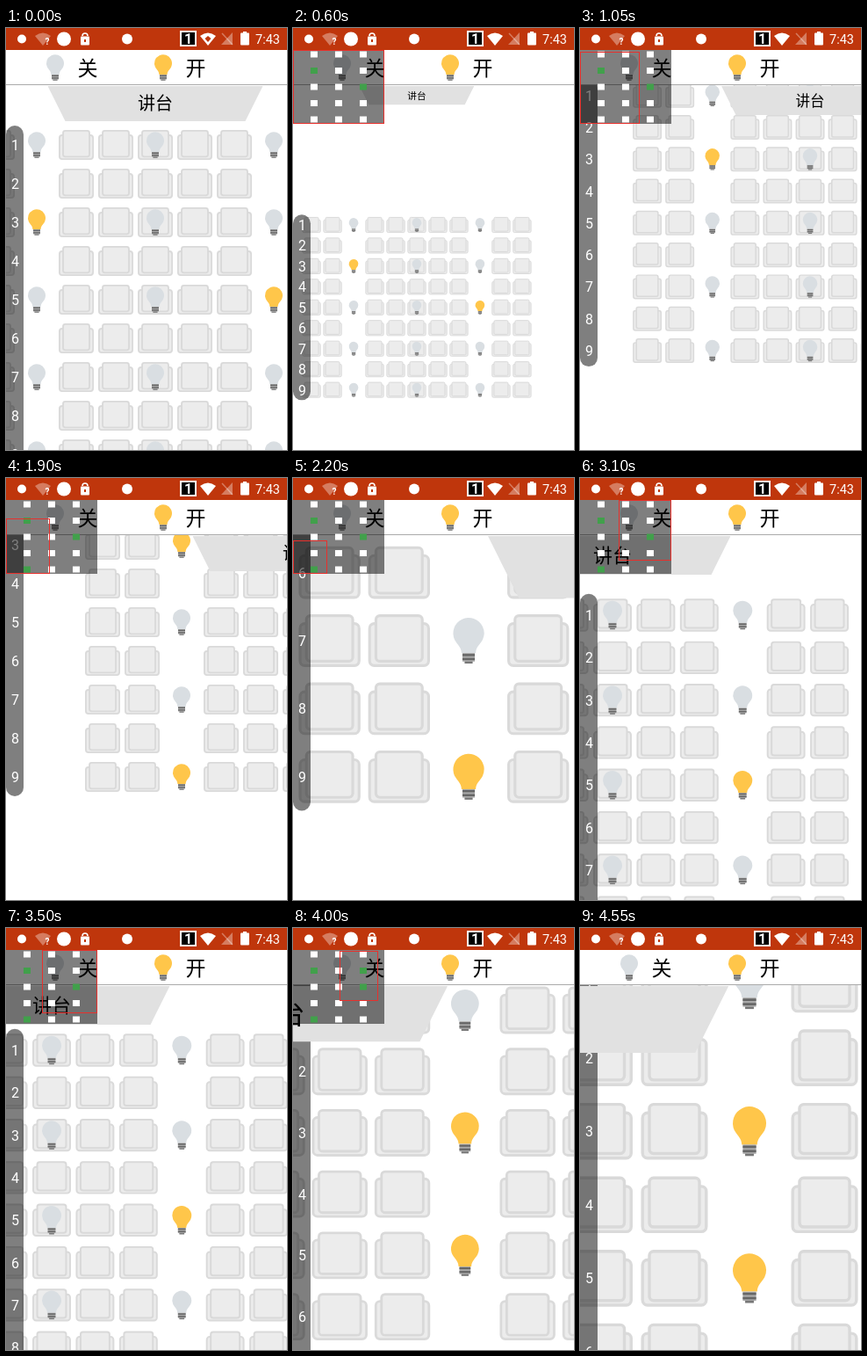
These frames come from a looping animation (320x480 px, 4950 ms). An HTML page with a canvas:

```html
<!DOCTYPE html>
<html lang="zh-CN">
<head>
<meta charset="utf-8">
<title>讲台</title>
<style>
html, body { margin: 0; width: 320px; height: 480px; overflow: hidden; background: #fff; }
canvas { display: block; }
</style>
</head>
<body>
<canvas id="stage" width="320" height="480"></canvas>
<script>
const c = document.getElementById('stage').getContext('2d');
const LOOP = 4950, STEP = 50;
const CJK = '"Noto Sans CJK SC", "Noto Sans CJK", sans-serif';
const LATIN = 'Roboto, sans-serif';

// time, scale, x of the middle column, y of row 1, eased approach
const keys = [
  [0, 1, 170, 133], [350, 1, 170, 133],
  [600, .533, 141, 224], [700, .533, 141, 224],
  [1300, 1, 335, -12, 1], [1900, 1, 335, -12],
  [2300, 1.9, 456.5, -329, 1], [2600, 1.098, 254, 21.6, 1],
  [3100, 1.098, 37, 156], [3500, 1.098, 52, 139, 1], [3800, 1.098, 52, 139],
  [4150, 1.9, -63.5, 64, 1], [LOOP, 1.9, -63.5, 64]
];

function pose(t) {
  const i = keys.findIndex(k => k[0] > t);
  const a = keys[i - 1], b = keys[i];
  let u = (t - a[0]) / (b[0] - a[0]);
  if (b[4]) u = u * u * (3 - 2 * u);
  return [1, 2, 3].map(n => a[n] + (b[n] - a[n]) * u);
}

function isOn(col, row, t) {
  return col === 2 && (row === 3 || row === 9 && t >= 1900) ||
         col === 8 && (row === 5 || row === 3 && t >= 3700);
}

function rect(x, y, w, h, fill) {
  c.fillStyle = fill;
  c.fillRect(x, y, w, h);
}

function round(x, y, w, h, r, fill, line) {
  c.beginPath();
  c.roundRect(x, y, w, h, r);
  c.fillStyle = fill;
  c.fill();
  if (line) { c.strokeStyle = line; c.stroke(); }
}

function shape(points, fill) {
  c.beginPath();
  points.forEach(p => c.lineTo(...p));
  c.closePath();
  c.fillStyle = fill;
  c.fill();
}

function dot(x, y, r) {
  c.beginPath();
  c.arc(x, y, r, 0, 7);
  c.fillStyle = '#fff';
  c.fill();
}

function text(str, x, y, font, fill) {
  c.font = font;
  c.fillStyle = fill;
  c.textAlign = 'center';
  c.fillText(str, x, y);
}

function at(x, y, s, draw) {
  c.save();
  c.translate(x, y);
  c.scale(s, s);
  draw();
  c.restore();
}

function seat() {
  c.lineWidth = 1.8;
  round(-19.1, -11, 38.2, 27.1, 3, '#ececec', '#dadada');
  round(-15, -16.1, 30, 29.4, 2.5, '#ececec', '#d9d9d9');
}

function bulb(on) {
  c.beginPath();
  c.arc(0, -4.8, 10, 2.7, .44);
  c.bezierCurveTo(7, 3, 4.8, 4, 4.6, 8);
  c.lineTo(-4.6, 8);
  c.bezierCurveTo(-4.8, 4, -7, 3, -9, -.5);
  c.fillStyle = on ? '#ffc64a' : '#d9dee2';
  c.fill();
  rect(-4, 8, 8, 5.5, '#aaa');
  rect(-4, 8.6, 8, 1.4, '#666');
  rect(-4, 11.2, 8, 1.4, '#666');
  rect(-2.6, 13.4, 5.2, 1.4, '#777');
}

function hall(t, s, x, y) {
  for (let row = 1; row <= 9; row++) {
    for (let col = 0; col <= 10; col++) {
      const aisle = col === 2 || col === 8;
      at(x + (col - 5) * 45 * s, y + (row - 1) * 44 * s, s, () => {
        if (!aisle) seat();
        if (row % 2 && (aisle || col === 5)) bulb(isOn(col, row, t));
      });
    }
  }
  round(0, y - 22 * s, 20, 396 * s, 10, 'rgba(0,0,0,.5)');
  for (let row = 1; row <= 9; row++)
    text(row, 10.5, y + (row - 1) * 44 * s + 6, '16px ' + LATIN, '#fff');
  at(x, 66, s, () => {
    shape([[-122.5, 0], [122.5, 0], [102.5, 40], [-102.5, 40]], '#e1e1e1');
    text('讲台', 0, 27.3, '500 20px ' + CJK, '#000');
  });
}

function header() {
  rect(0, 25, 320, 40, '#fff');
  rect(0, 64, 320, 1, '#aaa');
  at(56, 45, 1, () => bulb(false));
  at(179, 45, 1, () => bulb(true));
  text('关', 93, 54, '23px ' + CJK, '#000');
  text('开', 216, 54, '23px ' + CJK, '#000');
}

function overview(t, s, x, y) {
  rect(0, 25, 104, 84, 'rgba(0,0,0,.5)');
  for (let row = 1; row <= 9; row += 2)
    for (const col of [2, 5, 8])
      rect(col * 9.333 + 1.3, 26.5 + (row - 1) * 9.25, 8, 7,
        isOn(col, row, t) ? '#41a04b' : '#fff');
  const kx = 9.333 / 45 / s, ky = 9.25 / 44 / s;
  const left = Math.max(0, 50.5 - x * kx);
  const right = Math.min(104, 53 + (320 - x) * kx);
  const top = Math.max(25, 30 + (65 - y) * ky);
  const bottom = Math.min(109, 31.8 + (480 - y) * ky);
  c.strokeStyle = '#e8302c';
  c.lineWidth = 1;
  c.strokeRect(Math.round(left) + .5, Math.round(top) + .5,
    Math.round(right - left) - 1, Math.round(bottom - top) - 1);
}

function wifi(x, fill) {
  c.beginPath();
  c.moveTo(x, 20);
  c.lineTo(x - 9, 9);
  c.quadraticCurveTo(x, 2, x + 9, 9);
  c.closePath();
  c.fillStyle = fill;
  c.fill();
}

function statusBar(t) {
  const red = '#bf360c', pale = 'rgba(255,255,255,.35)';
  rect(0, 0, 320, 25, red);
  dot(18, 12.5, 5);
  wifi(42, pale);
  text('?', 47, 19, 'bold 10px ' + LATIN, '#fff');
  dot(66, 12.5, 8);
  c.strokeStyle = '#fff';
  c.lineWidth = 1.6;
  c.beginPath();
  c.arc(90, 9, 3, Math.PI, 0);
  c.stroke();
  round(85, 9.5, 10, 10, 1, '#fff');
  rect(89, 13, 2, 3, red);
  dot(138, 12.5, 6);

  rect(198, 3, 19, 18, '#fff');
  rect(200, 5, 15, 14, '#000');
  text('1', 207.5, 18, 'bold 16px ' + LATIN, '#fff');
  wifi(230, '#fff');
  if (t < STEP) shape([[230, 9], [233.5, 12], [230, 16], [226.5, 12]], red);
  shape([[258, 5], [258, 19], [245, 19]], pale);
  c.strokeStyle = pale;
  c.lineWidth = 1.5;
  c.beginPath();
  c.moveTo(246, 6);
  c.lineTo(258, 19);
  c.stroke();
  rect(270, 4, 4, 2, '#fff');
  round(267, 5.5, 10, 14, 1, '#fff');
  text('7:43', 298, 18, '14.5px ' + LATIN, '#fff');
}

function draw(now) {
  const t = Math.floor(now % LOOP / STEP) * STEP;
  const [s, x, y] = pose(t);
  rect(0, 0, 320, 480, '#fff');
  hall(t, s, x, y);
  header();
  if (t >= 50 && t < 4550) overview(t, s, x, y);
  statusBar(t);
}

const start = performance.now();
function tick() {
  draw(performance.now() - start);
  requestAnimationFrame(tick);
}
tick();
</script>
</body>
</html>
```
